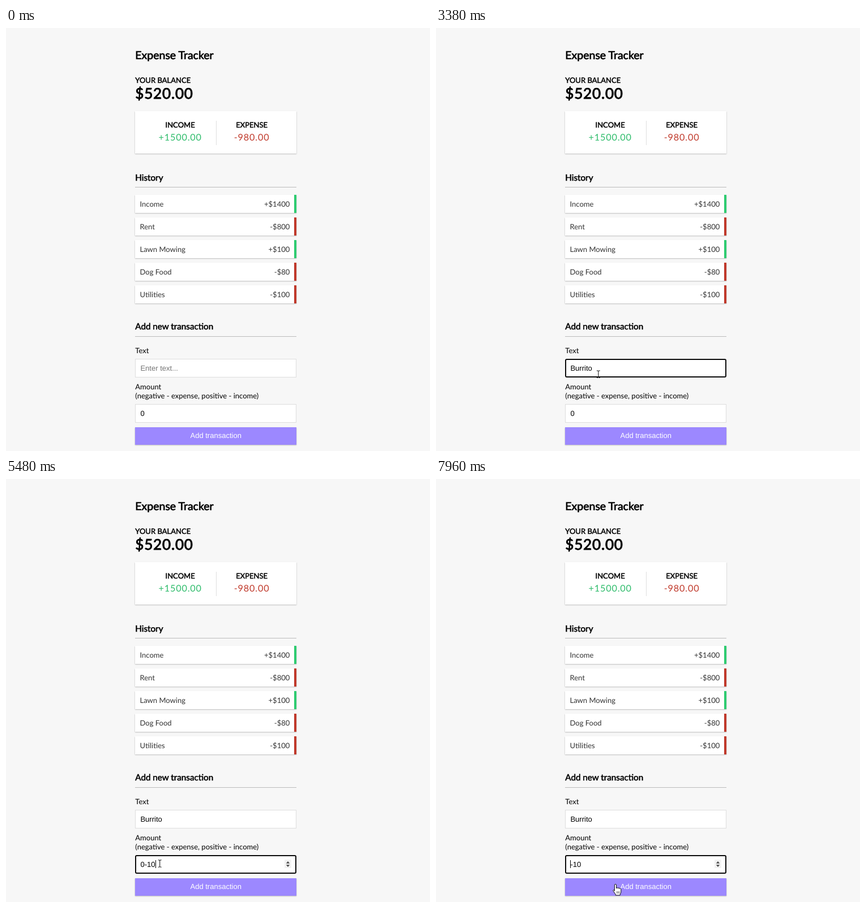
Write an HTML page that moves like this. It is 749 by 748 pixels and loops after 8000 ms.

```html
<!DOCTYPE html>
<html lang="en">
<head>
<meta charset="utf-8">
<title>Expense Tracker</title>
<style>
  html, body { margin: 0; width: 100%; height: 100%; overflow: hidden; background: #f7f7f7; }
  #stage { position: absolute; left: 0; top: 0; width: 749px; height: 748px; overflow: hidden; }
  #stage div { position: absolute; left: 228px; width: 285px; box-sizing: border-box; background: #fff; }
  #stage .card { box-shadow: 0 .8px 2.4px rgba(0,0,0,.12), 0 .8px 1.6px rgba(0,0,0,.24); }
  #stage .plus { border-right: 4px solid #2ecc71; }
  #stage .minus { border-right: 4px solid #c0392b; }
  #stage .rule { height: 1px; background: #bbb; }
  #stage .field { height: 33px; border: 1px solid #dedede; }
  #stage .focus { border: 2px solid #0c0c0c; border-radius: 3px; }
  #stage .button { background: #9c88ff; }
  svg { position: absolute; left: 0; top: 0; }
  text { font-family: Lato, sans-serif; font-size: 13.02px; white-space: pre; text-rendering: geometricPrecision; }
  .ui { font-family: "Liberation Sans", Arial, sans-serif; }
  .bold { stroke: #000; }
  .mid { text-anchor: middle; }
  .end { text-anchor: end; }
</style>
</head>
<body>
<div id="stage">
  <svg id="art" width="749" height="748" viewBox="0 0 749 748">
    <g id="words"></g>
    <g id="spin">
      <rect x="492" y="673" width="12" height="15" fill="#f2f2f2"/>
      <path d="M498 676l3.2 3.8h-6.4zM498 686l3.2-3.8h-6.4z" fill="#484848"/>
    </g>
    <rect id="caret" width="1" height="14"/>
    <g id="pointer">
      <g id="arrow">
        <path d="M0 0V15l3.5-3.3 2.4 5.5 2.2-1-2.4-5.2h4.8z" fill="#fff" stroke="#000" stroke-width=".9"/>
      </g>
      <g id="beam" fill="none">
        <path d="M-3-6.2h1.6L0-5.4l1.4-.8H3M0-5.4V5.4M-3 6.2h1.6L0 5.4l1.4.8H3" stroke="#222" stroke-width="1.1"/>
      </g>
      <g id="hand">
        <path d="M-1.6 11.5V1.2a1.6 1.6 0 0 1 3.2 0V7q.3-1.2 1.6-1.2T4.6 7q.4-.9 1.5-.9T7.4 7.6q.3-.6 1.1-.6 1.3 0 1.3 1.6V13q0 2-1.6 4v2H.2v-1.6L-3.8 11.6q-.9-1.6.3-2t1.9 1.9z"
          fill="#fff" stroke="#111" stroke-width="1" stroke-linejoin="round"/>
        <path d="M2.6 12v4M4.7 12v4M6.8 12v4" stroke="#222" stroke-width=".7"/>
      </g>
      <circle id="halo" cx="-1.5" cy="-1" r="12" fill="#fff000" opacity=".6"/>
    </g>
  </svg>
</div>
<script>
const LOOP = 8000, LEFT = 228.3, TEXT_X = 237.45;
const $ = id => document.getElementById(id);
const stage = $('stage'), art = $('art');

function box(cls, top, height, style = {}) {
  const el = document.createElement('div');
  el.className = cls;
  el.style.top = top + 'px';
  if (height) el.style.height = height + 'px';
  Object.assign(el.style, style);
  stage.insertBefore(el, art);
  return el;
}

function write(str, x, y, { size = 13.02, cls = '', fill = '#000', gap = 0 } = {}) {
  const el = document.createElementNS('http://www.w3.org/2000/svg', 'text');
  el.textContent = str;
  el.setAttribute('x', x);
  el.setAttribute('y', y);
  el.setAttribute('class', cls);
  el.style.fontSize = size + 'px';
  el.style.fill = fill;
  el.style.letterSpacing = gap + 'px';
  if (cls.includes('bold')) el.style.strokeWidth = size / 27;
  $('words').appendChild(el);
  return el;
}

// Summary
write('Expense Tracker', LEFT, 55, { size: 19.53, cls: 'bold' });
write('YOUR BALANCE', LEFT, 96.5, { cls: 'bold' });
write('$520.00', LEFT, 125, { size: 26.04, cls: 'bold', gap: .81 });
box('card', 147, 75);
box('split', 164, 43, { left: '371px', width: '1px', background: '#dedede' });
write('INCOME', 307.6, 176.2, { cls: 'bold mid' });
write('EXPENSE', 434.1, 176.2, { cls: 'bold mid' });
write('+1500.00', 307.6, 199, { size: 16.27, cls: 'mid', fill: '#2ebc6b', gap: .81 });
write('-980.00', 434.1, 199, { size: 16.27, cls: 'mid', fill: '#c0392b', gap: .81 });

// History
write('History', LEFT, 269.9, { size: 15.23, cls: 'bold' });
box('rule', 281);
[['Income', '+$1400'], ['Rent', '-$800'], ['Lawn Mowing', '+$100'], ['Dog Food', '-$80'], ['Utilities', '-$100']]
  .forEach(([name, sum], i) => {
    const top = 295.1 + 39.87 * i;
    box('card ' + (sum[0] === '+' ? 'plus' : 'minus'), Math.round(top), 32);
    write(name, 236.5, top + 21.1, { fill: '#333' });
    write(sum, 501.3, top + 21.1, { cls: 'end', fill: '#333' });
  });

// Form
write('Add new transaction', LEFT, 533.4, { size: 15.23, cls: 'bold' });
box('rule', 545);
write('Text', LEFT, 574.9);
write('Amount', LEFT, 639.1);
write('(negative - expense, positive - income)', LEFT, 654.5);
box('card button', 706, 31);
write('Add transaction', 370.7, 725.4, { cls: 'ui mid', fill: '#fff' });

const fields = [
  { el: box('field', 585), text: write('', TEXT_X, 605.9, { cls: 'ui' }), caretY: 595 },
  { el: box('field', 665), text: write('', TEXT_X, 685.6, { cls: 'ui' }), caretY: 674 }
];

// [time, text, caret index]
const typing = [
  [[0, '', 0], [1740, 'B', 1], [1990, 'Bu', 2], [2370, 'Bur', 3], [2450, 'Burr', 4],
   [2600, 'Burri', 5], [2750, 'Burrit', 6], [2830, 'Burrito', 7]],
  [[0, '0', 1], [5230, '0-', 2], [5400, '0-1', 3], [5480, '0-10', 4], [6880, '0-10', 1], [7880, '-10', 0]]
];
const caretOff = [[1300, 1740], [3380, 3940], [4700, 5160], [6010, 6560], [7340, 7880]];
const clicks = [[730, 820], [4160, 4240], [6880, 6960]];

// [start, step length, steps, from, to]
const moves = [
  [120, 76, 8, [180, 675], [289, 602.5]],
  [3380, 80, 8, [289, 602.5], [271.7, 680]],
  [6330, 76, 6, [271.7, 680], [246, 683]],
  [6960, 76, 4, [246, 683], [288, 717]],
  [7720, 80, 4, [288, 717], [317, 717]]
];

const within = (list, t) => list.some(([a, b]) => t >= a && t < b);
const latest = (list, t) => list.filter(row => row[0] <= t).pop();
const show = (id, on) => { $(id).style.display = on ? '' : 'none'; };

function pointerAt(t) {
  const move = latest(moves, t);
  if (!move) return null;
  const [start, len, steps, from, to] = move;
  const p = Math.min(1, (Math.floor((t - start) / len) + 1) / steps);
  return from.map((v, i) => v + (to[i] - v) * p);
}

function pointerKind([x, y]) {
  if (x < 228 || x > 513) return 'arrow';
  if ((y >= 585 && y < 618) || (y >= 665 && y < 698)) return 'beam';
  return y >= 706 && y < 737 ? 'hand' : 'arrow';
}

function draw(t) {
  const active = t < 730 ? -1 : t < 4160 ? 0 : 1;
  fields.forEach((f, i) => {
    const [, str, index] = latest(typing[i], t);
    const blank = !str;
    f.el.classList.toggle('focus', i === active);
    f.text.textContent = blank ? 'Enter text...' : str;
    f.text.style.fill = blank ? '#757575' : '#000';
    if (i === active) {
      const w = index ? f.text.getSubStringLength(0, index) : 0;
      $('caret').setAttribute('x', Math.round(TEXT_X + w));
      $('caret').setAttribute('y', f.caretY);
    }
  });
  show('caret', active >= 0 && !within(caretOff, t));

  const pos = pointerAt(t);
  show('pointer', pos);
  const kind = pos && pointerKind(pos);
  if (pos) $('pointer').setAttribute('transform', `translate(${pos})`);
  ['arrow', 'beam', 'hand'].forEach(k => show(k, k === kind));
  show('halo', within(clicks, t));
  show('spin', active === 1 || (kind === 'beam' && pos[1] > 660));
}

function tick() {
  draw(performance.now() % LOOP);
  requestAnimationFrame(tick);
}
tick();
</script>
</body>
</html>
```
